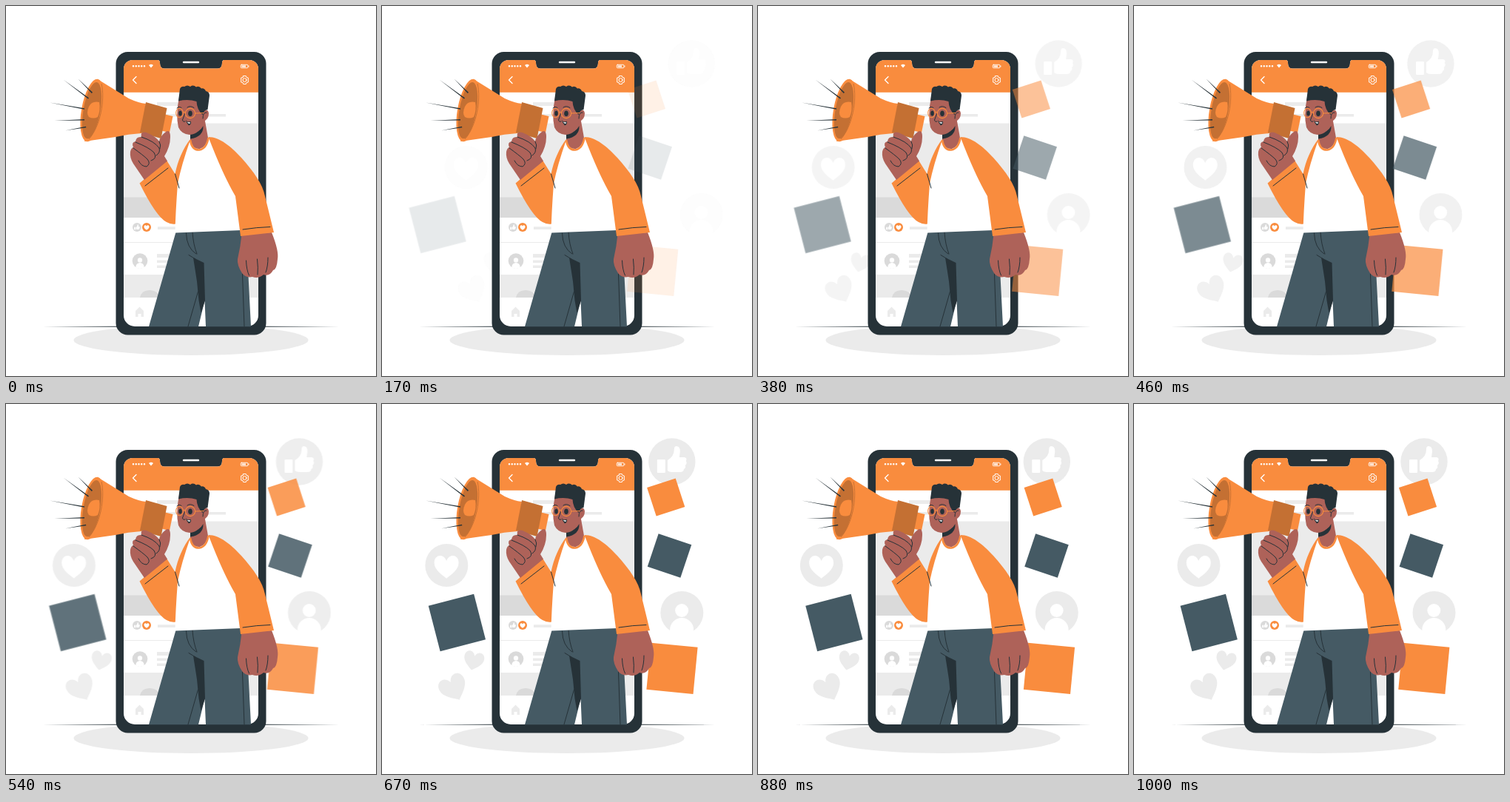
Write an HTML page that moves like this. It is 500x500 px and loops after 1040 ms.

```html
<!DOCTYPE html>
<html lang="en">
<head>
<meta charset="utf-8">
<title>Social media promotion</title>
<style>
  html, body { margin: 0; width: 100%; height: 100%; overflow: hidden; background: #fff; }
  svg { display: block; width: 100vw; height: 100vh; }
  .ink { fill: #263238; }
  .slate { fill: #455a64; }
  .orange { fill: #f98c3e; }
  .rust { fill: #c47033; }
  .skin { fill: #ae6259; }
  .pale { fill: #ebebeb; }
  .mid { fill: #dadada; }
  .white { fill: #fff; }
  .line { fill: none; stroke: #263238; stroke-width: 1; stroke-linecap: round; stroke-linejoin: round; }
  .thin { fill: none; stroke: #fff; stroke-width: 1.3; stroke-linecap: round; stroke-linejoin: round; }
  .rim { fill: none; stroke: #f98c3e; stroke-width: 1.1; }
</style>
</head>
<body>
<svg viewBox="0 0 500 500">
  <defs>
    <path id="heart" d="M0 .95C-.35 .65-1 .25-1-.32C-1-1.02-.22-1.12 0-.48C.22-1.12 1-1.02 1-.32C1 .25 .35 .65 0 .95Z"/>
    <g id="thumb">
      <rect x="-20" y="-3" width="11" height="18" rx="1"/>
      <path d="M-6-2Q3-7 3-17Q3-21 6-21Q11-21 11-14L10-6H17Q21-5 19-1Q21 2 18 5Q19 9 16 10Q16 14 11 14H0Q-4 14-6 12Z"/>
    </g>
    <g id="user">
      <circle cy="-3" r="9"/>
      <path d="M-16 26V23A16 16 0 0 1 16 23V26Q0 34-16 26Z"/>
    </g>
    <clipPath id="screen">
      <path d="M159 85A12 12 0 0 1 171 73H205Q208 73 208 77Q208 84.4 214 84.4H286Q292 84.4 292 77Q292 73 295 73H329A12 12 0 0 1 341 85V418A15 15 0 0 1 326 433H174A15 15 0 0 1 159 418Z"/>
    </clipPath>
  </defs>

  <path class="ink" d="M50 433.3L150 432.7H350L450 433.3L350 433.8H150Z"/>
  <ellipse class="pale" cx="250" cy="451.5" rx="158.5" ry="20.5"/>

  <g id="bubbles">
    <circle class="pale" cx="392" cy="78" r="31.7"/>
    <use href="#thumb" class="white" x="392" y="78"/>
    <circle class="pale" cx="87.5" cy="218" r="29"/>
    <use href="#heart" class="white" transform="translate(87.3 220) scale(16.5)"/>
    <circle class="pale" cx="405.5" cy="282" r="29"/>
    <use href="#user" class="white" x="405.3" y="282"/>
    <use href="#heart" class="pale" transform="translate(124 347) rotate(13) scale(13.6)"/>
    <use href="#heart" class="pale" transform="translate(97 384) rotate(-27) scale(18.5)"/>
  </g>

  <!-- Phone -->
  <rect class="ink" x="148.5" y="62" width="203" height="382.5" rx="16"/>
  <path class="thin" style="stroke-width:2.4" d="M240 76H260"/>
  <g clip-path="url(#screen)">
    <path class="white" d="M159 73H341V433H159Z"/>
    <path class="orange" d="M159 73H341V116.7H159Z"/>
    <path d="M172 81.2H188" fill="none" stroke="#fff" stroke-width="2.5" stroke-linecap="round" stroke-dasharray="0 3.75"/>
    <path class="white" d="M193 80Q196 77.5 199 80L196 83.4Z"/>
    <rect x="317.3" y="79.3" width="9.6" height="4.4" rx="1" class="thin" style="stroke-width:.9"/>
    <path class="white" d="M318.5 80.4H324V82.6H318.5ZM327.4 80.5H328.4V82.5H327.4Z"/>
    <path class="thin" d="M176 95.5L171.5 100L176 104.5"/>
    <path class="thin" style="stroke-width:1" d="M320.7 94.5H324.3L325 96.5L327.3 97V103L325 103.5L324.3 105.5H320.7L320 103.5L317.7 103V97L320 96.5Z"/>
    <circle class="thin" cx="322.5" cy="100" r="2.5" style="stroke-width:1"/>

    <path class="pale" d="M204 130H262V135H204ZM204 146H297V149.5H204ZM159 158.5H341V286H159Z"/>
    <path class="mid" d="M159 258.5H341V286H159Z"/>
    <circle class="mid" cx="177" cy="299" r="6"/>
    <use href="#thumb" class="white" transform="translate(177 299.3) scale(.19)"/>
    <circle class="orange" cx="190" cy="299" r="6"/>
    <use href="#heart" class="white" transform="translate(190 299.5) scale(3.5)"/>
    <path class="pale" d="M205 298.3H240V302H205ZM159 319H341V320H159ZM204 335H240V340H204ZM204 343.5H240V347H204ZM204 350.5H240V354H204ZM159 363H341V394H159Z"/>
    <circle class="mid" cx="181" cy="344.5" r="10.3"/>
    <use href="#user" class="white" transform="translate(181 344.5) scale(.35)"/>
    <path class="mid" d="M181 394Q183 384 194 384Q205 384 208 394Z"/>
    <path class="pale" d="M180.5 406.5L186 412V420H182.5V416H178.5V420H175V412Z"/>
  </g>

  <g id="tiles">
    <rect class="slate" x="-31.7" y="-31.7" width="63.4" height="63.4" transform="translate(101.2 295.5) rotate(-14.5)"/>
    <rect class="orange" x="-20.3" y="-20.3" width="40.6" height="40.6" transform="translate(383.5 126) rotate(-18)"/>
    <rect class="slate" x="-23.5" y="-23.5" width="47" height="47" transform="translate(388.3 205) rotate(18.5)"/>
    <rect class="orange" x="-31.7" y="-31.7" width="63.4" height="63.4" transform="translate(391.8 357.3) rotate(5.5)"/>
  </g>

  <!-- Trousers -->
  <path class="slate" d="M230 304L193 433.3H260L268.5 398L270 433.3H331L327.5 365L318 301Z"/>
  <path class="ink" d="M253 340L267.5 347L269 398L263.5 415L260.5 398L258 372Z"/>
  <path class="line" d="M259.5 386L246 433M243.5 307Q244 327 257 335M252 306Q253 322 258 335M247 336.5L256 342M319.5 362L322 433"/>

  <!-- Neck, shirt and sleeves -->
  <path class="orange" d="M249 180C240 191 232 209 228.5 227L217 208.5L180.5 239.5Q203 285 217 292Q223 295.5 229 294.5L240 225Z"/>
  <path class="white" d="M249 181Q237 215 232 240Q229 280 228.5 306.5L318 303L310 256L276 178Q262 200 249 181Z"/>
  <path class="skin" d="M249 165V183Q253 194 262 193Q271 190 273 178L268 150Z"/>
  <path class="rim" style="stroke-width:2.6" d="M249 181Q251 195 261 194.5Q271 193 273.5 178"/>
  <path class="ink" d="M249 173Q262 171 266.5 162Q267 177 249 179.5Z"/>
  <path class="skin" d="M318.5 308L359 306Q369 331 367 342Q366 356 361 357Q356 366 348 363Q341 369 333 366Q324 368 319 361Q312 350 313 342Q317 325 318.5 308Z"/>
  <path class="line" d="M324.5 344Q325 357 328.5 364M339.5 342Q341 354 340 363M354 340Q354 352 351 360"/>
  <path class="orange" d="M273.5 177C289 177 304 190 318 205C335 224 347 241 350 257L362 306L317 311L310 257Q293 228 273.5 177Z"/>
  <path class="line" d="M320 302Q339 299 357 298.5M188 243L219 219M228.5 227L234 246"/>

  <!-- Megaphone -->
  <path class="orange" d="M124 99L166 125Q179 131 189 132L183 172Q165 173 148 177L106 183Z"/>
  <ellipse class="orange" cx="116.5" cy="141" rx="14.5" ry="42.8" transform="rotate(10 116.5 141)"/>
  <ellipse class="rust" cx="116" cy="141.2" rx="11.5" ry="38.7" transform="rotate(10 116 141.2)"/>
  <path class="orange" d="M126 130Q116 128 112 136Q108 145 112 150Q118 153 124 150Q128 140 126 130Z"/>
  <path fill="none" stroke="#c47033" stroke-width=".9" d="M129 105C134 126 128 162 112 180"/>
  <path class="orange" d="M213 146L225.5 149L221 171L208 168Z"/>
  <path class="rust" d="M189 130L217.5 138L209.5 179L181 171Z"/>
  <path class="ink" d="M77.500 99.500L112 124.300L111 125.600ZM97.500 98.500L117 116.700L115.800 118ZM59 130.500L106 138.300L105.800 139.800ZM65.500 155L106 153V154.500ZM80.500 168.300L108 162.800L108.300 164.300Z"/>

  <!-- Gripping hand -->
  <path class="skin" d="M187 235L172 213Q167 205 168 197Q169 192 172 191Q169 184 175 183Q176 176 183 177Q181 169 190 171Q202 176 207 183Q208 176 216 170Q222 166 222 177Q222 190 214 203L218 209.5Z"/>
  <path class="line" d="M183 177Q201 183 207 192Q209 198 203 202M175 184Q193 191 200 198Q205 206 196 209M172 192Q186 202 191 207Q196 213 190 217Q183 217 179 209M207 183Q210 188 208 193"/>

  <!-- Head -->
  <path class="skin" d="M234 123Q229 148 233 164Q237 173 248 174Q263 173 266 156Q274 154 274 145Q273 138 266 142L267 123Z"/>
  <path class="ink" d="M233 128.5L235 112Q237 108 241 109Q245 106 249 109Q253 106 257 109.5Q261 107.5 264 111.5Q268 110.5 270 115Q275 116 275 121L272.5 140Q268 140 265.5 147Q258 140 257.5 129Q246 125.500 233 128.5Z"/>
  <path class="line" d="M266 152Q266 143 271 144M231 138Q234 135 237 137.5M245 137Q249 134 254 137.5M241.5 146L238.5 154Q239 157 242 156"/>
  <ellipse class="ink" cx="235.5" cy="145" rx="2.3" ry="3.5"/>
  <ellipse class="ink" cx="249" cy="145.3" rx="2.8" ry="3.8"/>
  <path class="ink" d="M243 154Q245 158 249.5 155.5Q251 160 247 161.5Q244 159 243 154Z"/>
  <path class="white" d="M244.5 156.5Q247 158 249 156.8L248.5 159Q246 159 244.5 156.5Z"/>
  <path class="rim" d="M255.5 145L267 144.5M239 144Q240.5 142.5 242.5 144"/>
  <circle class="rim" cx="249" cy="145" r="6.6"/>
  <ellipse class="rim" cx="234.5" cy="144.5" rx="4.8" ry="6.2"/>
</svg>
<script>
  const LOOP = 1040, FPS = 24, SHIFT = 30;
  const tiles = document.getElementById("tiles");
  const bubbles = document.getElementById("bubbles");

  const bezier = (a, b, s) => 3 * (1 - s) ** 2 * s * a + 3 * (1 - s) * s * s * b + s ** 3;

  // Cubic easing with a small overshoot near the end.
  function ease(x) {
    let lo = 0, hi = 1;
    for (let i = 0; i < 24; i++) {
      const mid = (lo + hi) / 2;
      if (bezier(0.36, 0.5, mid) < x) lo = mid; else hi = mid;
    }
    return bezier(-0.01, 1.38, lo);
  }

  function place(group, dx, opacity) {
    group.setAttribute("transform", `translate(${dx} 0)`);
    group.setAttribute("opacity", opacity);
  }

  function draw(now) {
    const step = Math.min(FPS, Math.floor((now % LOOP + 5) * FPS / 1000));
    const y = ease(Math.min(1, (step + 0.5) / FPS));
    const dx = SHIFT * (1 - y), opacity = Math.max(0, Math.min(1, y));
    place(tiles, -dx, opacity);
    place(bubbles, dx, opacity);
  }

  const start = performance.now();
  function tick() {
    draw(performance.now() - start);
    requestAnimationFrame(tick);
  }
  tick();
</script>
</body>
</html>
```
